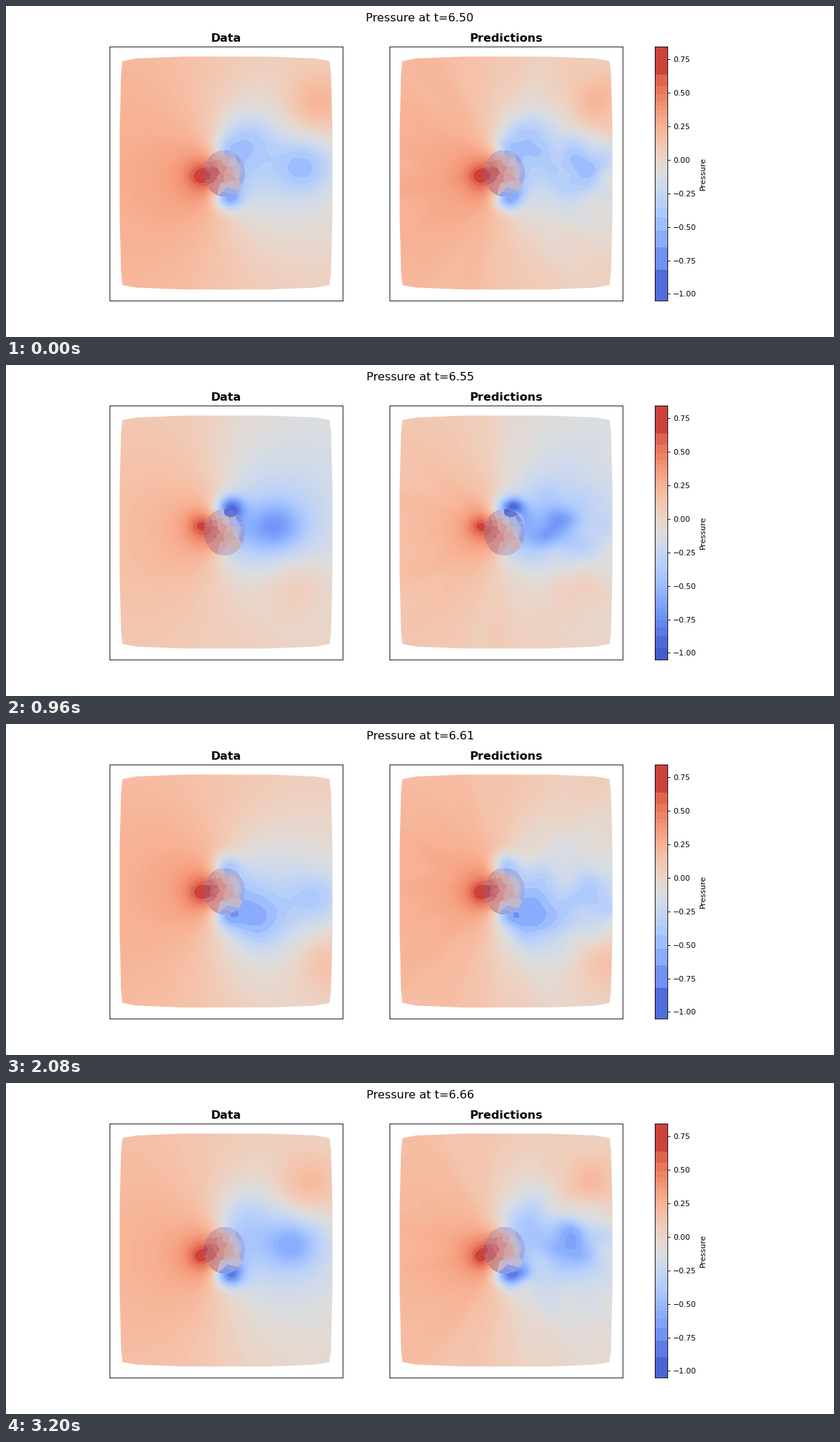
A matplotlib script for the animation above (3.36 s loop, 1183 by 473 pixels).

```python
import numpy as np
import matplotlib as mpl
import matplotlib.pyplot as plt
from matplotlib.animation import FuncAnimation
from matplotlib.patches import Polygon

W, H, DPI = 1183, 473, 64
FRAMES, INTERVAL = 21, 160
PERIOD = 22                      # frames per vortex shedding cycle
VMIN, VMAX = -1.05, 0.846
TOP, BOTTOM = 57.6, 421.0
LEFT, WIDTH, SHIFT = 147.9, 333.4, 400.05
CX, CY, RX, RY = 312, 239, 29, 33.5   # cylinder
TAU = 2 * np.pi

plt.rcParams["font.family"] = "DejaVu Sans"
cmap = mpl.colormaps["coolwarm"]


def px(n):
    """Pixels to points."""
    return n * 72 / DPI


# Sample grid in stage pixels of the left panel
x0, x1, y0, y1 = 161, 469, 71, 407
X, Y = np.meshgrid(np.arange(x0, x1) + 0.5, np.arange(y0, y1) + 0.5)


def outline():
    """A barrel shape: one corner, mirrored to the other three."""
    corner = [(152, 60), (150, 141), (148, 160), (128, 163.7), (61, 166.4)]
    points = []
    for sx, sy in ((1, 1), (-1, 1), (-1, -1), (1, -1)):
        points += [(314.4 + sx * dx, 238.7 + sy * dy)
                   for dx, dy in corner[::sx * sy]]
    return points


def gauss(x, y, cx, cy, sx, sy=None):
    return np.exp(-(((x - cx) / sx) ** 2 + ((y - cy) / (sy or sx)) ** 2) / 2)


def wave(i, offset, period):
    return np.cos(TAU * (i - offset) / period)


def vortex(age):
    """Position (height above the axis) and strength of a shed vortex."""
    height = 20 + 30 * np.cos(np.pi * np.clip(age + 1, 0, 12) / 11)
    return 338 + 8 * max(age, 0), height, 0.5 * np.sin(np.pi * (age + 5) / PERIOD)


def spot(age):
    """The high pressure that travels on the other side of the axis."""
    swell = np.sin(np.pi * np.clip((age - 3) / 14, 0, 1))
    return 372 + 6.5 * age, -105 * np.tanh(age / 7), 0.29 * swell


def pressure(i, x, y):
    u, v = (x - CX) / RX, (CY - y) / RY
    rho2 = u * u + v * v
    p = 0.08 - 0.05 * wave(i, 6, PERIOD / 2)
    p = p - 0.36 * u / np.maximum(rho2, 1) ** 0.8
    p = p + 0.3 * np.clip(1 - rho2, 0, 1)

    # front stagnation point
    sy = CY - 10 * wave(i, 7, PERIOD)
    p += 0.4 / (1 + ((x - 278) ** 2 + (y - sy) ** 2) / 16 ** 2)

    # sideways swing of the far field
    p -= 0.06 * wave(i, 6, PERIOD) * np.tanh(v / 3) / (1 + np.exp(-2 * (u + 0.3)))

    for side, lag in ((1, 0), (-1, PERIOD // 2)):
        age = (i + lag + 5) % PERIOD - 5
        vx, height, amp = vortex(age)
        vy = CY - side * height
        p -= amp * (0.75 * gauss(x, y, vx, vy, 28, 25)
                    + 0.35 * gauss(x, y, vx, vy, 70))
        bx, height, amp = spot(age)
        p += amp * gauss(x, y, bx, CY - side * height, 36, 33)
        pull = 0.42 + 0.38 * wave(age, 7.5, PERIOD)
        p -= pull * gauss(x, y, 315 + 5 * wave(age, 7, PERIOD),
                          CY - side * 34, 14, 13)
    return p


# Coarse cells inside the cylinder
rng = np.random.default_rng(4)
inside = ((X - CX) / RX) ** 2 + ((Y - CY) / RY) ** 2 < 1
ang = rng.uniform(0, TAU, 48)
rad = np.sqrt(rng.uniform(0, 1, 48))
seed_x, seed_y = CX + RX * rad * np.cos(ang), CY + RY * rad * np.sin(ang)
nearest = np.argmin((X[inside][:, None] - seed_x) ** 2
                    + (Y[inside][:, None] - seed_y) ** 2, axis=1)
cell_x, cell_y = seed_x[nearest], seed_y[nearest]

# Ripples that roughen the predicted field
ripples = [(TAU / rng.uniform(35, 100), rng.uniform(0, TAU), rng.uniform(0, TAU))
           for _ in range(12)]
wake = 1 / (1 + np.exp(-(X - 330) / 14)) * np.exp(-((Y - CY) / 75) ** 2)
theta = np.arctan2(Y - CY, X - CX)
far = np.clip(np.hypot(X - CX, Y - CY) / 90 - 0.4, 0, 1)


def rough(i, part):
    total = 0
    for k, a, phase in ripples[part::3]:
        total = total + np.sin(k * (np.cos(a) * (X - 5 * i) + np.sin(a) * Y) + phase)
    return total / 2


def predicted(i):
    reach = 1 + 5 * wake
    p = pressure(i, X + reach * rough(i, 0), Y + reach * rough(i, 1))
    p += 0.03 * wake * rough(i, 2)
    streak = np.sin(11 * theta + 0.4 * i) + np.sin(17 * theta - 0.3 * i + 1)
    return p + 0.008 * far * streak


def bands(i):
    """Colour steps: wide at both ends, fine in the middle."""
    low = -0.89 - 0.08 * wave(i, 6.5, PERIOD / 2)
    lower, upper = [VMIN], [VMAX]
    edge, step = low, 0.17 - 0.55 * (-0.82 - low)
    while step > 0.02:
        lower.append(edge)
        edge += step
        step *= 0.75
    top, step = 0.635, 0.085
    while step > 0.02:
        upper.append(top)
        top -= step
        step *= 0.75
    middle = np.linspace(edge, top, 70)
    return np.concatenate([lower, middle, upper[::-1]])


def colours(values, edges):
    mids = (edges[1:] + edges[:-1]) / 2
    mids[0] += 0.03
    mids[-1] -= 0.03
    k = np.clip(np.searchsorted(edges, values) - 1, 0, len(mids) - 1)
    return cmap((mids[k] - VMIN) / (VMAX - VMIN))[..., :3]


TINT = np.array([125, 105, 172]) / 255


def picture(p, i, edges):
    p[inside] = pressure(i, cell_x, cell_y)
    rgb = colours(p, edges)
    rgb[inside] = 0.7 * rgb[inside] + 0.3 * TINT
    return rgb


fig = plt.figure(figsize=(W / DPI, H / DPI), dpi=DPI, facecolor="white")


def add_axes(left, width):
    ax = fig.add_axes([left / W, 1 - BOTTOM / H, width / W, (BOTTOM - TOP) / H])
    for spine in ax.spines.values():
        spine.set_linewidth(px(0.876))
        spine.set_zorder(5)
    return ax


def add_panel(left, title):
    ax = add_axes(left, WIDTH)
    im = ax.imshow(np.ones((*X.shape, 3)), extent=(x0, x1, y1, y0),
                   aspect="auto", interpolation="nearest")
    ax.set(xlim=(LEFT, LEFT + WIDTH), ylim=(BOTTOM, TOP), xticks=[], yticks=[])
    im.set_clip_path(Polygon(outline(), transform=ax.transData))
    ax.set_title(title, fontsize=px(16.43), fontweight="bold", pad=px(6.57))
    return im


data_im = add_panel(LEFT, "Data")
pred_im = add_panel(LEFT + SHIFT, "Predictions")

scale = np.linspace(VMIN, VMAX, 364)[:, None]
bar = add_axes(927.3, 18)
bar_im = bar.imshow(np.ones((364, 1, 3)), extent=(0, 1, VMIN, VMAX), origin="lower",
                    aspect="auto", interpolation="nearest")
bar.set_xticks([])
bar.yaxis.tick_right()
bar.yaxis.set_label_position("right")
bar.set_yticks(np.arange(-1, 0.8, 0.25))
bar.yaxis.set_major_formatter("{x:.2f}")
bar.tick_params(axis="y", labelsize=px(10.95), length=px(3.83),
                width=px(0.876), pad=px(3.83))
bar.set_ylabel("Pressure", fontsize=px(10.95), labelpad=px(4.38))

heading = fig.text(0.5, 0.978, "", ha="center", va="top", fontsize=px(16.43))


def draw(i):
    edges = bands(i)
    data_im.set_data(picture(pressure(i, X, Y), i, edges))
    pred_im.set_data(picture(predicted(i), i, edges))
    bar_im.set_data(colours(scale, edges))
    heading.set_text(f"Pressure at t={6.504 + 0.008 * i:.2f}")
    return data_im, pred_im, bar_im, heading


anim = FuncAnimation(fig, draw, frames=FRAMES, interval=INTERVAL, repeat=True)
plt.show()
```
